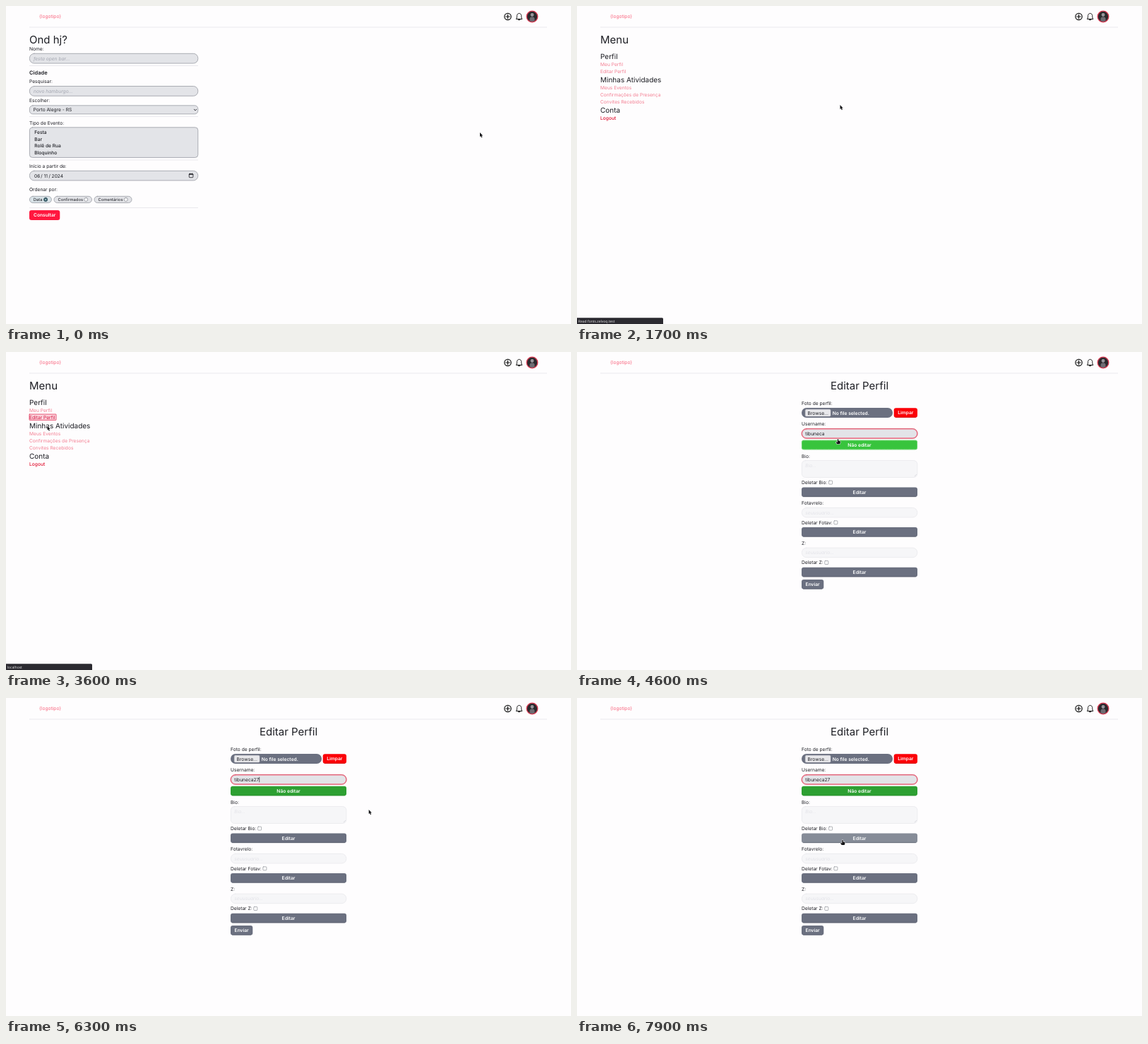
An HTML page with a canvas for the animation above (8 s loop, 800 by 450 pixels).

```html
<!DOCTYPE html>
<html lang="pt-BR">
<head>
<meta charset="utf-8">
<title>Editar Perfil</title>
<style>
html, body { margin: 0; width: 100%; height: 100%; overflow: hidden; background: #fefdfe; }
canvas { display: block; width: 800px; height: 450px; }
</style>
</head>
<body>
<canvas id="stage" width="800" height="450"></canvas>
<script>
const ctx = document.getElementById('stage').getContext('2d');
const LOOP = 8000, STEP = 100;
const INK = '#1d1e24', SLATE = '#6b7080', FIELD = '#e3e4e8', EDGE = '#9a9ca4';
const USER = 'tibuneca';
const BASE = 20 / 3;

// Page changes and clicks, in ms
const AT = { menu: 1100, focus: 3000, edit: 3700, enable: 4500, caret: 5000, digits: [5600, 5900], blur: 7400 };

// Pointer path: time, x, y
const PATH = [
  [100, 671, 179], [500, 708, 92], [800, 744, 15], [1000, 746, 13], [1200, 743, 14],
  [1500, 437, 64], [1600, 437, 64], [1700, 372.5, 140], [2000, 190, 128], [2500, 62, 83],
  [3100, 60, 91], [3400, 60, 91], [3600, 58.5, 104.5], [3700, 75, 106], [4300, 371, 128],
  [4400, 371, 128], [4600, 369.5, 123.2], [4800, 365, 115], [5100, 440, 190], [5300, 474.5, 151.5],
  [5400, 474.5, 151.5], [6000, 479, 151], [6200, 479, 151], [6500, 583, 172], [6900, 387, 138.8],
  [7100, 386, 138], [7900, 376, 201]
];

// Status bar: start, end, text
const STATUS = [
  [800, 1100, 'localhost/menu'],
  [1100, 1800, 'Read fonts.zelvoq.test'],
  [2400, 3500, 'localhost/editar'],
  [3500, 3800, 'localhost'],
  [3800, 4200, 'Read fonts.zelvoq.test']
];

function pointerAt(t) {
  let a = PATH[0];
  for (const b of PATH) {
    if (t <= b[0]) {
      const k = b === a ? 0 : Math.max(0, (t - a[0]) / (b[0] - a[0]));
      return { x: a[1] + (b[1] - a[1]) * k, y: a[2] + (b[2] - a[2]) * k };
    }
    a = b;
  }
  return { x: a[1], y: a[2] };
}

const inside = (p, x, y, w, h, pad = 0) =>
  p.x >= x - pad && p.x <= x + w + pad && p.y >= y - pad && p.y <= y + h + pad;

// Text placed by the middle of its capitals
function text(str, x, y, { size = BASE, weight = 400, color = INK, align = 'left', italic = false, font = 'Inter' } = {}) {
  ctx.font = `${italic ? 'italic ' : ''}${weight} ${size}px ${font}, sans-serif`;
  ctx.textRendering = 'geometricPrecision';
  ctx.textAlign = align;
  ctx.fillStyle = color;
  ctx.fillText(str, x, y + size * 0.36);
  return ctx.measureText(str).width;
}

function box(x, y, w, h, r, fill, stroke, line = 0.8) {
  ctx.beginPath();
  ctx.roundRect(x, y, w, h, r);
  if (fill) { ctx.fillStyle = fill; ctx.fill(); }
  if (stroke) { ctx.strokeStyle = stroke; ctx.lineWidth = line; ctx.stroke(); }
}

function disc(x, y, r, fill, stroke, line = 0.8) {
  box(x - r, y - r, 2 * r, 2 * r, r, fill, stroke, line);
}

function rule(x, y, w) {
  ctx.fillStyle = '#e4e4e9';
  ctx.fillRect(x, y - 0.4, w, 0.8);
}

function stroke(d, color = INK, line = 1) {
  ctx.strokeStyle = color;
  ctx.lineWidth = line;
  ctx.lineCap = ctx.lineJoin = 'round';
  ctx.stroke(new Path2D(d));
}

function header() {
  text('{logotipo}', 47, 15, { color: '#f8637c' });
  rule(33, 30, 733);
  disc(710.5, 15, 4.7, null, '#111', 1.2);
  stroke('M707.8 15H713.2M710.5 12.3V17.7', '#111', 1.2);
  stroke('M722.6 18.2C723.8 16.8 723.3 15 723.5 13.6C724 9.4 729.2 9.4 729.7 13.6C729.9 15 729.4 16.8 730.6 18.2ZM725.4 19.7H727.8', '#111', 1);
  disc(745, 15, 7.8, '#2b292d', '#d83a52', 1.3);
  ctx.save();
  ctx.beginPath();
  ctx.arc(745, 15, 7, 0, 7);
  ctx.clip();
  disc(745, 12.5, 2.4, '#97959b');
  box(741.5, 15.5, 7, 9, 3, '#6f6c73');
  ctx.restore();
}

function searchPage() {
  const field = (y, h, r = 6.5) => box(33.4, y, 238.4, h, r, FIELD, EDGE);
  const hint = (s, y) => text(s, 39, y, { italic: true, color: '#a3a6b0' });
  text('Ond hj?', 33, 47.5, { size: 15 });
  text('Nome:', 33, 60.5);
  field(67.3, 13.8);
  hint('festa open bar...', 74.3);
  rule(33, 84.5, 239);
  text('Cidade', 33, 94.5, { size: 7.5, weight: 600 });
  text('Pesquisar:', 33, 106.8);
  field(113.5, 13.8);
  hint('novo hamburgo...', 120.5);
  text('Escolher:', 33, 134);
  field(140.8, 12, 4.5);
  text('Porto Alegre - RS', 38.7, 147);
  stroke('M266.3 146.2L268 147.9L269.7 146.2', INK, 0.9);
  rule(33, 156.4, 239);
  text('Tipo de Evento:', 33, 165.2);
  field(171.8, 42.6, 4);
  ['Festa', 'Bar', 'Rolê de Rua', 'Bloquinho'].forEach((s, i) => text(s, 40.3, 178.5 + i * 9.6, { weight: 500 }));
  rule(33, 218, 239);
  text('Início a partir de:', 33, 226.5);
  field(233.3, 13.6);
  [['06', 40], ['/', 49.3], ['11', 53.5], ['/', 60.6], ['2024', 64.6]].forEach(([s, x]) => text(s, x, 240.2));
  box(259.3, 237.5, 5.6, 5.2, 0.7, null, INK, 0.8);
  stroke('M259.3 238.6H264.9M260.7 236.8V238M263.5 236.8V238', INK, 0.8);
  text('Ordenar por:', 33, 259.3);
  [['Data', 33.4, 31, true], ['Confirmados', 68, 53.5], ['Comentários', 125, 53]].forEach(([s, x, w, on]) => {
    box(x, 269.3, w, 9.2, 4.6, on ? '#d9e3e8' : FIELD, EDGE);
    text(s, x + 5.4, 274, { size: 35 / 6 });
    disc(x + w - 8.3, 273.9, 2.6, on ? '#3f6570' : '#f5f5f7', on ? '#2f4d58' : '#85878f', 0.7);
    if (on) disc(x + w - 8.3, 273.9, 0.9, '#c9dde2');
  });
  rule(33, 285.4, 239);
  box(33, 289, 43.3, 14, 3, '#ff173f');
  text('Consultar', 54.7, 296, { weight: 600, color: '#fff', align: 'center' });
}

const LINKS = [['Meu Perfil', 82.3], ['Editar Perfil', 92.3], ['Meus Eventos', 115.5], ['Confirmações de Presença', 125.5], ['Convites Recebidos', 135.5]];

function menuPage(t, p) {
  let hand = false;
  text('Menu', 33, 47.5, { size: 15 });
  [['Perfil', 71], ['Minhas Atividades', 104.2], ['Conta', 147.5]].forEach(([s, y]) => text(s, 33, y, { size: 10 }));
  LINKS.forEach(([s, y], i) => {
    const over = inside(p, 33, y - 5, 37, 10);
    const focus = i === 1 && t >= AT.focus;
    if (focus) box(33, y - 4.3, 38, 8.4, 0.5, '#fbd3dc', '#e2365b', 0.8);
    text(s, 33, y, { color: focus ? '#d4143f' : over ? '#e83558' : '#f37f92' });
    hand = hand || over;
  });
  text('Logout', 33, 159, { weight: 500, color: '#e0102f' });
  return hand;
}

function button(label, y, p, { fill = SLATE, lit = '#868c98', edge = '#555a68', x = 318, w = 164, dashed = false } = {}) {
  const over = inside(p, x, y, w, 13.5, 2);
  box(x, y, w, 13.5, 3, over ? lit : fill);
  if (over && dashed) {
    ctx.setLineDash([1.2, 1.2]);
    box(x + 0.4, y + 0.4, w - 0.8, 12.7, 3, null, '#8be08d', 0.8);
    ctx.setLineDash([]);
  } else {
    stroke(`M${x + 2.5} ${y + 13.2}H${x + w - 2.5}`, edge, 0.7);
  }
  text(label, x + w / 2, y + 6.7, { weight: 600, color: '#fff', align: 'center' });
  return over;
}

function check(label, y) {
  const w = text(label, 318, y);
  box(318 + w + 2.2, y - 2.4, 5, 5, 0.8, '#fff', '#8f9199', 0.7);
}

function ghostField(y, h, hint, hintY = y + h / 2) {
  box(318.4, y, 163.4, h, h > 20 ? 5 : 6.5, '#f6f6f8', '#e9e9ed');
  text(hint, 323.3, hintY, { italic: true, color: '#e3e3e8' });
}

function editPage(t, p) {
  const open = t >= AT.enable;
  text('Editar Perfil', 400, 47.5, { size: 15, align: 'center' });
  text('Foto de perfil:', 318, 72.3);
  box(318, 79, 129, 14, 7, SLATE);
  box(323.3, 81.2, 35.7, 9.8, 1.5, '#e8e8eb', '#c9c9cf', 0.5);
  text('Browse...', 341.2, 86.2, { align: 'center' });
  text('No file selected.', 361.7, 86.2, { weight: 600, color: '#fff' });
  let hand = button('Limpar', 79.2, p, { x: 448.7, w: 33.3, fill: '#fb0007', lit: '#ff3a3f', edge: '#c40008' });

  text('Username:', 318, 102);
  const typed = USER + '27'.slice(0, AT.digits.filter(d => t >= d).length);
  if (open) {
    box(318.3, 108.7, 163.6, 13.4, 6.7, FIELD, '#f6b9c3', 2);
    box(318.3, 108.7, 163.6, 13.4, 6.7, null, '#d9536a', 1);
  } else {
    ghostField(108.7, 13.4, '');
  }
  const w = text(typed, 323.3, 115.6, { color: open ? INK : '#c9cad0' });
  const last = t >= AT.digits[1] ? AT.digits[1] : AT.caret - 100;
  if (t >= AT.caret && t < AT.blur && Math.floor((t - last) / 500) % 2 === 0) {
    ctx.fillStyle = INK;
    ctx.fillRect(323.4 + w, 111.8, 0.7, 7.4);
  }
  const green = { fill: '#2da032', lit: '#38c43d', edge: '#25892a', dashed: true };
  hand = button(open ? 'Não editar' : 'Editar', 124.7, p, open ? green : {}) || hand;

  text('Bio:', 318, 147.2);
  ghostField(153.6, 23.8, 'Bio...', 161);
  stroke('M478.2 175.8L480.6 173.4', '#c9c9cf', 0.6);
  check('Deletar Bio:', 184.5);
  hand = button('Editar', 191.5, p) || hand;

  [['Fotavrelo:', 'Deletar Fotav:', 0], ['Z:', 'Deletar Z:', 56.7]].forEach(([label, del, dy]) => {
    text(label, 318, 213.7 + dy);
    ghostField(220.4 + dy, 13.6, 'seuusuario...');
    check(del, 241.2 + dy);
    hand = button('Editar', 248 + dy, p) || hand;
  });
  return button('Enviar', 322, p, { x: 318, w: 31.3 }) || hand;
}

function statusBar(t) {
  const s = STATUS.find(([a, b]) => t >= a && t < b);
  if (!s) return;
  box(0, 441.3, 122, 9, [0, 1.5, 0, 0], '#2b2a30');
  text(s[2], 1.8, 445.8, { size: 5, color: '#dededf', font: 'Noto Sans' });
}

function pointer({ x, y }, hand) {
  const shape = new Path2D(hand
    ? 'M-.7 .2Q0 -.6 .7 .2V2.4L3 3Q3.6 3.3 3.4 4.4L2.8 7H-1.3L-3 4.4Q-2.6 3.5 -.7 4.6Z'
    : 'M0 0V6L1.3 4.9L2.3 7.3L3.4 6.8L2.4 4.5H4.2Z');
  ctx.save();
  ctx.translate(x, y);
  ctx.lineJoin = 'round';
  ctx.lineWidth = 1.1;
  ctx.strokeStyle = 'rgba(255,255,255,.9)';
  ctx.stroke(shape);
  ctx.fillStyle = '#151518';
  ctx.fill(shape);
  ctx.restore();
}

function draw(t) {
  const p = pointerAt(t);
  let hand = inside(p, 737, 7, 16, 16);
  ctx.fillStyle = '#fefdfe';
  ctx.fillRect(0, 0, 800, 450);
  header();
  if (t < AT.menu) searchPage();
  else if (t < AT.edit) hand = menuPage(t, p) || hand;
  else hand = editPage(t, p) || hand;
  statusBar(t);
  pointer(p, hand);
}

const start = performance.now();
function tick() {
  const t = (performance.now() - start) % LOOP;
  draw(Math.floor(t / STEP) * STEP);
  requestAnimationFrame(tick);
}
tick();
</script>
</body>
</html>
```
